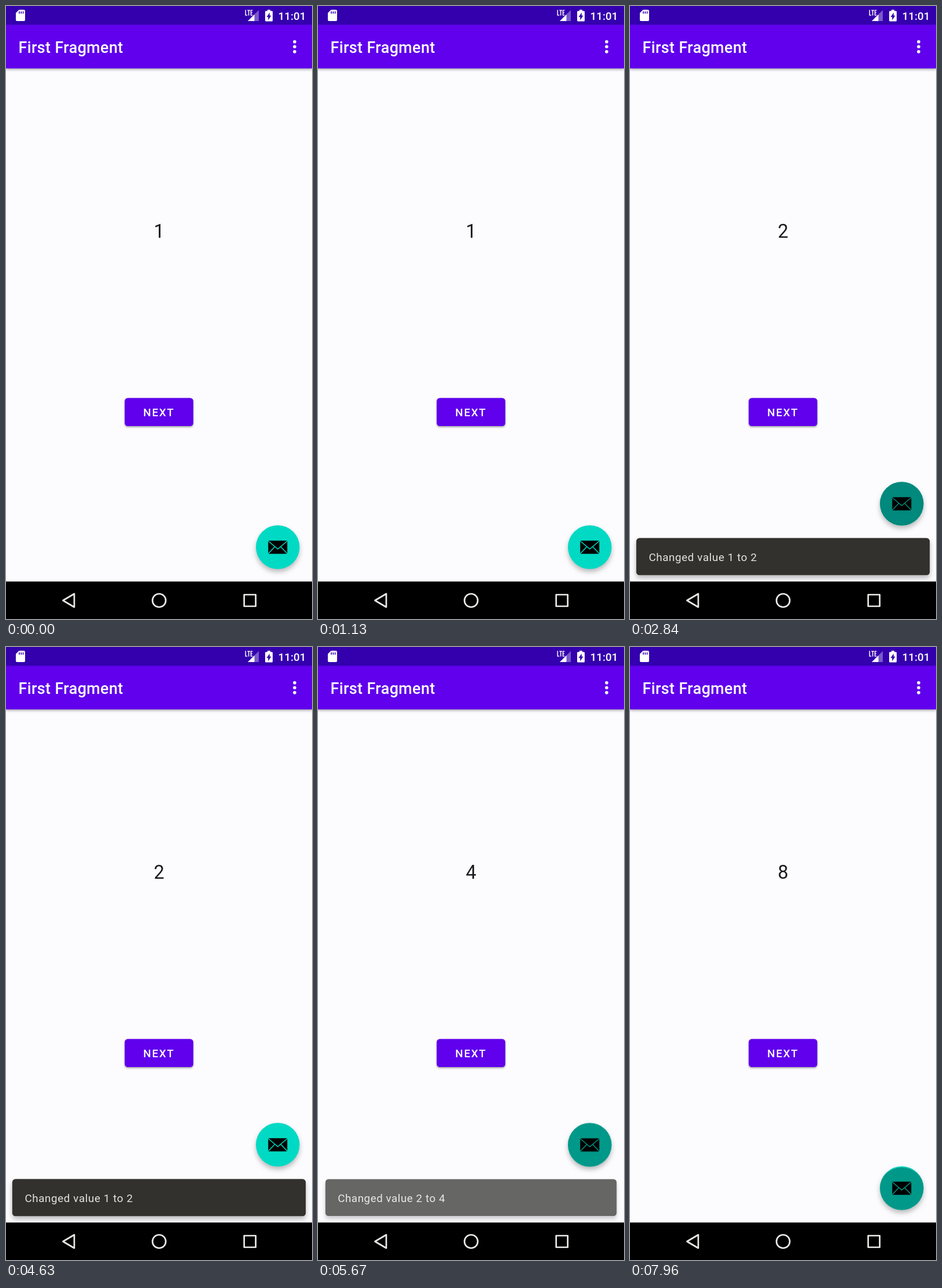
An HTML page for the animation above (8 s loop, 529 by 1058 pixels).

```html
<!DOCTYPE html>
<html lang="en">
<head>
<meta charset="utf-8">
<title>First Fragment</title>
<style>
  html, body { margin: 0; width: 100%; height: 100%; overflow: hidden; background: #fcfcfe; }
  svg { display: block; width: 529px; height: 1058px; }
  text { font-family: Roboto, sans-serif; white-space: pre; }

  .title { font-size: 26.97px; font-weight: 500; letter-spacing: .337px; fill: #fff; }
  .clock { font-size: 18.88px; font-weight: 500; fill: #fff; }
  .label { font-size: 18.88px; font-weight: 500; letter-spacing: 1.69px; fill: #fff; }
  .value text { font-size: 32.4px; text-anchor: middle; fill: #1b1b1b; }
  .snack text { font-size: 18.88px; letter-spacing: .59px; fill: #e2e2e1; }

  .bar { fill: #6000ec; filter: drop-shadow(0 2px 2px #0005); }
  .button { fill: #6000ec; filter: drop-shadow(0 2px 1.5px #0005); }
  .disc { fill: #00dac4; filter: drop-shadow(0 5px 4px #0004); }
  .panel { fill: #32312d; filter: drop-shadow(0 5px 4px #0004); }

  .value text, .snack, .fab, .ripple { animation: 8s linear infinite; }

  /* Counter */
  .value text { animation-timing-function: step-end; }
  .v1 { animation-name: v1 !important; }
  .v2 { animation-name: v2 !important; }
  .v4 { animation-name: v4 !important; }
  .v8 { animation-name: v8 !important; }
  @keyframes v1 { 0% { opacity: 1 } 32.5%, 100% { opacity: 0 } }
  @keyframes v2 { 0% { opacity: 0 } 32.5% { opacity: 1 } 67.5%, 100% { opacity: 0 } }
  @keyframes v4 { 0% { opacity: 0 } 67.5% { opacity: 1 } 98.5%, 100% { opacity: 0 } }
  @keyframes v8 { 0% { opacity: 0 } 98.5%, 100% { opacity: 1 } }

  /* Snackbars: 150 ms in, 75 ms out */
  .snack { transform-origin: 264.5px 950.3px; }
  .s1 { animation-name: fade1, grow1; }
  .s2 { animation-name: fade2, grow2; }
  @keyframes fade1 {
    0%, 33% { opacity: 0 }
    34.875%, 67.5% { opacity: 1 }
    68.4375%, 100% { opacity: 0 }
  }
  @keyframes fade2 {
    0%, 69.5% { opacity: 0 }
    71.375%, 98.5% { opacity: 1 }
    99.4375%, 100% { opacity: 0 }
  }
  @keyframes grow1 {
    0% { transform: scale(.8) }
    33% { transform: scale(.8); animation-timing-function: cubic-bezier(0, 0, .2, 1) }
    34.875%, 100% { transform: none }
  }
  @keyframes grow2 {
    0% { transform: scale(.8) }
    69.5% { transform: scale(.8); animation-timing-function: cubic-bezier(0, 0, .2, 1) }
    71.375%, 100% { transform: none }
  }

  /* The round button keeps clear of the snackbar */
  .fab { animation-name: dodge; }
  @keyframes dodge {
    0%, 32.999% { transform: translateY(0) }
    33% { transform: translateY(-68.6px); animation-timing-function: cubic-bezier(0, 0, .2, 1) }
    34.875%, 68.437% { transform: translateY(-75px) }
    68.438%, 69.499% { transform: translateY(0) }
    69.5% { transform: translateY(-68.6px); animation-timing-function: cubic-bezier(0, 0, .2, 1) }
    71.375%, 99.437% { transform: translateY(-75px) }
    99.438%, 100% { transform: translateY(0) }
  }

  .ripple { transform-origin: 469.8px 934px; animation-name: tint, spread; }
  @keyframes tint {
    0%, 32.75% { opacity: 0 }
    33.6875%, 35.5625% { opacity: .37 }
    37.4375%, 67.75% { opacity: 0 }
    68.6875%, 70.5625% { opacity: .37 }
    72.4375%, 98.75% { opacity: 0 }
    99.6875%, 100% { opacity: .37 }
  }
  @keyframes spread {
    0% { transform: translateY(13px) scale(.42) }
    32.75% { transform: translateY(13px) scale(.42); animation-timing-function: cubic-bezier(0, 0, .2, 1) }
    35.5625%, 67.749% { transform: translateY(0) scale(1) }
    67.75% { transform: translateY(13px) scale(.42); animation-timing-function: cubic-bezier(0, 0, .2, 1) }
    70.5625%, 98.749% { transform: translateY(0) scale(1) }
    98.75% { transform: translateY(13px) scale(.42) }
    99.5% { transform: translateY(5.2px) scale(.77) }
    100% { transform: translateY(2.6px) scale(.88) }
  }
</style>
</head>
<body>
<svg viewBox="0 0 529 1058">
  <defs>
    <clipPath id="round"><circle cx="469.8" cy="934" r="37.8"/></clipPath>
  </defs>
  <rect width="529" height="1058" fill="#fcfcfe"/>

  <g class="value">
    <text class="v1" x="264.5" y="400.3">1</text>
    <text class="v2" x="264.5" y="400.3">2</text>
    <text class="v4" x="264.5" y="400.3">4</text>
    <text class="v8" x="264.5" y="400.3">8</text>
  </g>

  <rect class="button" x="205.2" y="676.5" width="118.6" height="48.6" rx="5.4"/>
  <text class="label" x="237.3" y="708.3">NEXT</text>

  <!-- App bar -->
  <rect class="bar" y="32" width="529" height="75.7"/>
  <text class="title" x="21.6" y="80.6">First Fragment</text>
  <g fill="#fff">
    <circle cx="499" cy="61.7" r="2.8"/>
    <circle cx="499" cy="70.2" r="2.8"/>
    <circle cx="499" cy="78.8" r="2.8"/>
  </g>

  <!-- Status bar -->
  <rect width="529" height="32.4" fill="#3400ae"/>
  <path d="M22.5 6.5H31a2 2 0 0 1 2 2V24a2 2 0 0 1-2 2H19a2 2 0 0 1-2-2V12z" fill="#fff"/>
  <path d="M23 9.3v4M26.3 9.3v4M29.6 9.3v4" stroke="#3400ae" stroke-width="1.6"/>
  <path d="M414.2 6.8v9h3M417.3 7.5h4.6M419.6 7.5v9M426.3 7.5h-2.8v8.3h2.8M423.5 11.6h2.4" fill="none" stroke="#fff" stroke-width="1.5"/>
  <path d="M437 7V26H418z" fill="#fff" opacity=".35"/>
  <path d="M429.5 14.5V26H418z" fill="#fff"/>
  <path d="M452 6.5h5V8.6h2.5a1.5 1.5 0 0 1 1.5 1.5V25a1.5 1.5 0 0 1-1.5 1.5h-10A1.5 1.5 0 0 1 448 25V10.100a1.500 1.500 0 0 1 1.500-1.500H452z" fill="#fff"/>
  <path d="M455.800 11.200v5.200h2.700l-5.200 8.200v-5.700h-2.700z" fill="#3400ae"/>
  <text class="clock" x="470.500" y="23.700">11:01</text>

  <!-- Mail button -->
  <g class="fab">
    <circle class="disc" cx="469.8" cy="934" r="37.8"/>
    <rect x="453.3" y="922.8" width="33" height="22.800" rx="1"/>
    <path d="M453.500 923.500L469.800 937.300L486.100 923.500M453.500 945L464.500 933.500M486.100 945L475.100 933.500" fill="none" stroke="#00dac4" stroke-width="1.5"/>
    <g clip-path="url(#round)">
      <circle class="ripple" cx="469.8" cy="934" r="53"/>
    </g>
  </g>

  <g class="snack s1">
    <rect class="panel" x="10.8" y="918.3" width="507.4" height="64" rx="5.4"/>
    <text x="32.4" y="957.8">Changed value 1 to 2</text>
  </g>
  <g class="snack s2">
    <rect class="panel" x="10.8" y="918.3" width="507.4" height="64" rx="5.4"/>
    <text x="32.4" y="957.8">Changed value 2 to 4</text>
  </g>

  <!-- Navigation bar -->
  <rect y="993.3" width="529" height="64.7"/>
  <g fill="none" stroke="#ebebe8" stroke-width="2.7" stroke-linejoin="round">
    <path d="M98.500 1026L118 1014.500V1037.500z"/>
    <circle cx="264.700" cy="1026" r="11.500"/>
    <rect x="411.700" y="1016" width="20" height="20"/>
  </g>
</svg>
</body>
</html>
```
